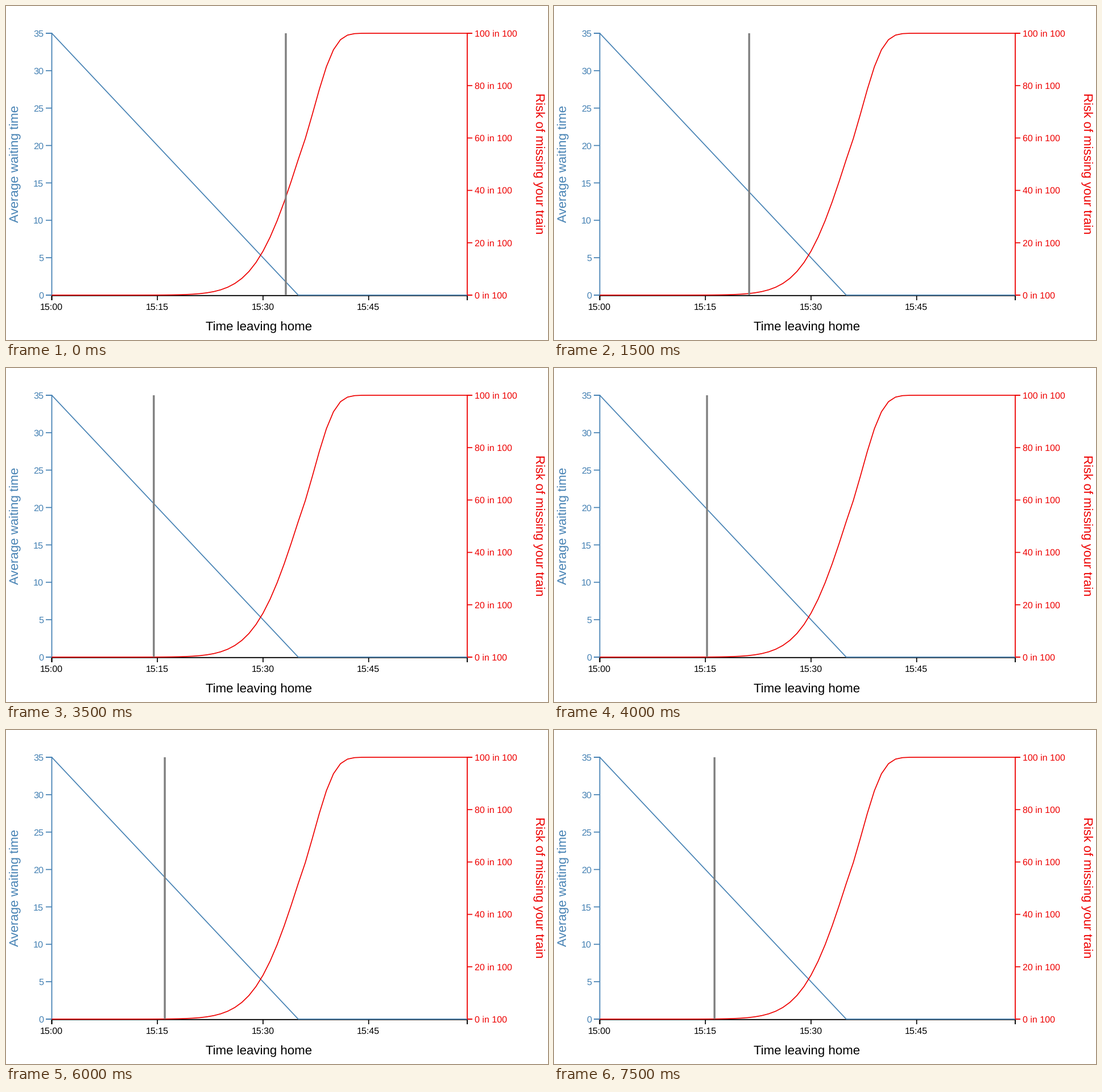
Animation, 953 px wide and 588 px high, one loop 8000 ms. Source, as a matplotlib script:

```python
import math

import matplotlib.pyplot as plt
import numpy as np
from matplotlib.animation import FuncAnimation

W, H, DPI = 953, 588, 64
PT = 72 / DPI                       # points per pixel
LEFT, RIGHT, TOP, BOTTOM = 80.5, 811, 48, 509
BLUE, RED, GREY = "#4682b4", "#ee0000", "#808080"

plt.rcParams.update({
    "font.family": "Liberation Sans",
    "text.hinting": "none",
    "path.snap": False,
})

fig = plt.figure(figsize=(W / DPI, H / DPI), dpi=DPI, facecolor="white")
ax = fig.add_axes([0, 0, 1, 1])
ax.set(xlim=(0, W), ylim=(H, 0))
ax.axis("off")


def minute_x(minute):
    return LEFT + (RIGHT - LEFT) * np.asarray(minute) / 59


def value_y(value, top_value):
    return BOTTOM - (BOTTOM - TOP) * np.asarray(value) / top_value


def line(xs, ys, color, width=1.7):
    return ax.plot(xs, ys, color=color, lw=width * PT,
                   solid_capstyle="butt", solid_joinstyle="miter")[0]


def label(x, y, text, color, size=16, ha="center", rotation=0):
    ax.text(x, y, text, color=color, fontsize=size * PT, ha=ha,
            va="baseline", rotation=rotation, rotation_mode="anchor")


def miss_risk(minute):
    """Normal distribution around 15:35 with a long early tail."""
    t = minute - 35
    slope = 0.211 + 0.0019 * t if t < 0 else 0.178 + 0.0238 * t
    return 50 * (1 + math.erf((0.045 + slope * t) / math.sqrt(2)))


# time axis, just below the zero line of the curves
base = BOTTOM + 0.8
line([LEFT, LEFT, RIGHT, RIGHT], [518, base, base, 518], "black", 1.9)
for minute in range(0, 60, 15):
    x = minute_x(minute)
    line([x, x], [base, 518], "black")
    label(x - 0.5, 535, f"15:{minute:02d}", "black")
label(445, 571, "Time leaving home", "black", 22.2)

# waiting time axis
line([70, LEFT, LEFT, 70], [TOP, TOP, BOTTOM, BOTTOM], BLUE, 1.8)
for wait in range(0, 36, 5):
    y = value_y(wait, 35)
    line([70, LEFT], [y, y], BLUE)
    label(66, y + 6, str(wait), BLUE, 16.3, ha="right")
label(22.5, 278, "Average waiting time", BLUE, 22.2, rotation=90)

# risk axis
line([820, RIGHT, RIGHT, 820], [TOP, TOP, BOTTOM, BOTTOM], RED, 1.8)
for risk in range(0, 101, 20):
    y = value_y(risk, 100)
    line([RIGHT, 820], [y, y], RED)
    label(824, y + 5.6, f"{risk} in 100", RED, ha="left")
label(930.5, 277, "Risk of missing your train", RED, 22.2, rotation=-90)

# curves
minutes = np.arange(60)
line(minute_x(minutes), value_y(np.maximum(35 - minutes, 0), 35), BLUE)
line(minute_x(minutes), value_y([miss_risk(m) for m in minutes], 100), RED)

# marker drags as (step, x); each one slows down towards its end
STEPS = 16
DRAGS = [(0, 492), (2, 439), (5, 247.3), (6, 247.3), (9, 272.4), (10, 293.3),
         (11, 289.2), (12, 279.2), (13, 279.2), (14, 273.2), (15, 282.2)]


def marker_x(step):
    for (s0, x0), (s1, x1) in zip(DRAGS, DRAGS[1:]):
        if step <= s1:
            return x0 + (x1 - x0) * math.sin(math.pi / 2 * (step - s0) / (s1 - s0))


marker = line([marker_x(0)] * 2, [TOP, 508.7], GREY, 3.4)
marker.set_zorder(5)


def update(step):
    marker.set_xdata([marker_x(step)] * 2)
    return [marker]


anim = FuncAnimation(fig, update, frames=STEPS, interval=500,
                     repeat=True, repeat_delay=0)
plt.show()
```
